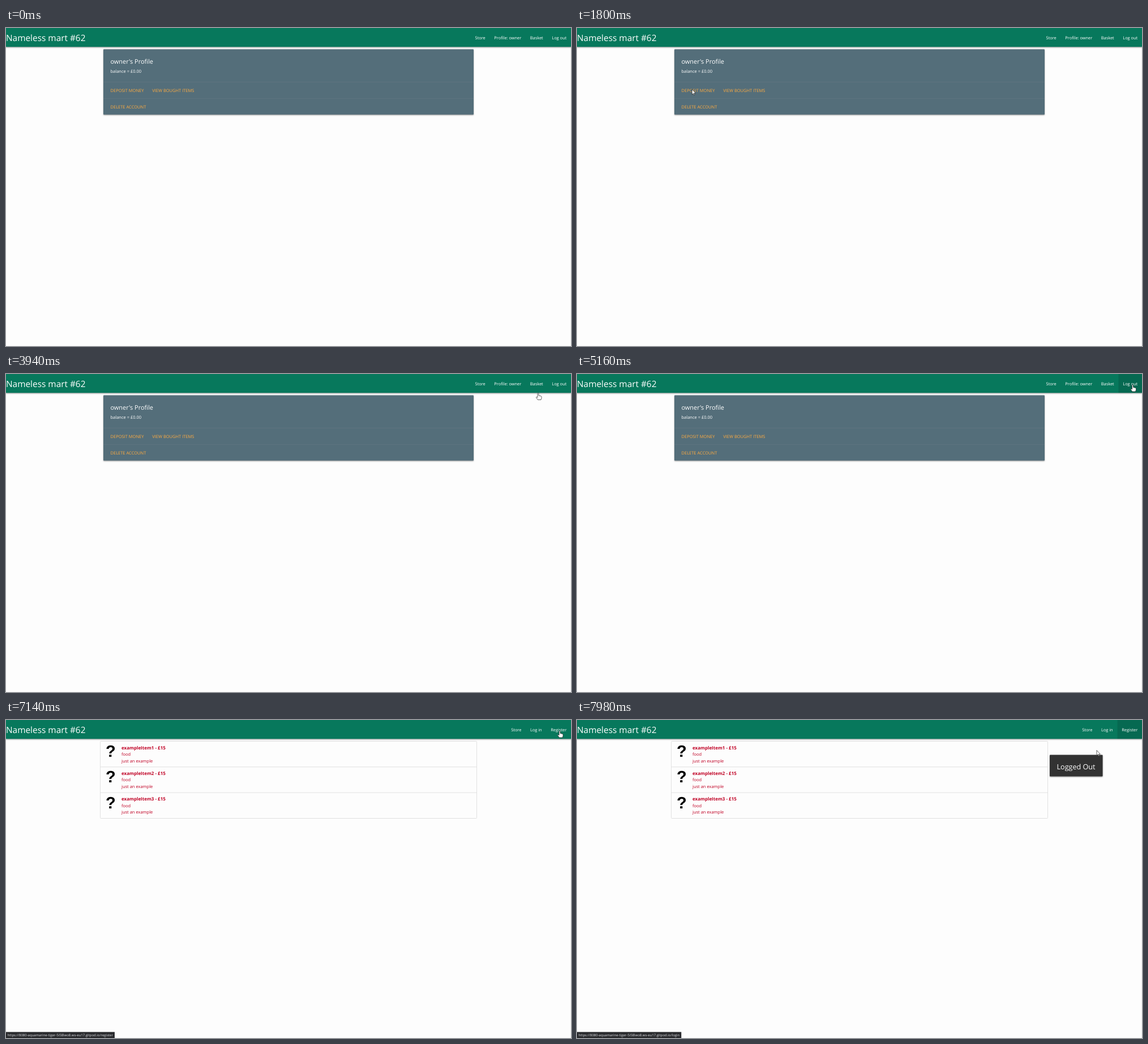
An HTML page that plays this animation: 998x561 px, repeating every 8 s.

```html
<!DOCTYPE html>
<html lang="en">
<head>
<meta charset="utf-8">
<style>
  html, body { margin: 0; width: 100%; height: 100%; overflow: hidden; background: #fdfdfd; }
  svg { display: block; width: 998px; height: 561px; font: 7.5px "Open Sans", "Noto Sans", sans-serif; text-rendering: geometricPrecision; }
  .raised { filter: drop-shadow(0 1px 1px #0006); }
  .white { fill: #fff; }
  .nav { fill: #fff; font-size: 7.4px; }
  .link { fill: #ffab40; }
  .item { fill: #c00024; }
  .name { font-size: 8px; font-weight: 700; }
  .mark { font: bold 29px "Liberation Sans", sans-serif; fill: #000; }
  .rule { fill: none; stroke: #dadada; stroke-width: .8; }
  .pointer { fill: #fff; stroke: #222; stroke-width: .7; stroke-linejoin: round; }
</style>
</head>
<body>
<svg viewBox="0 0 998 561">
  <rect x="997" y="34" width="1" height="527" fill="#f1f1f1"/>
  <rect class="raised" width="998" height="33.3" fill="#07785c"/>
  <text class="white" y="23" font-size="15.4">Nameless mart #62</text>

  <g id="profile">
    <rect class="raised" x="172" y="37.5" width="654" height="115.3" rx="1" fill="#546e7a"/>
    <path d="M172 95.3H826M172 124.3H826" stroke="#a0a0a0" stroke-opacity=".2" stroke-width=".7"/>
    <g class="white">
      <text x="184.5" y="63" font-size="10.9">owner's Profile</text>
      <text x="184.5" y="79.4" font-weight="500">balance = £0.00</text>
    </g>
    <g class="link">
      <text id="deposit" x="184.5" y="113">DEPOSIT MONEY</text>
      <text x="258.3" y="113">VIEW BOUGHT ITEMS</text>
      <text x="184.5" y="141.7">DELETE ACCOUNT</text>
    </g>
  </g>

  <g id="store">
    <rect class="rule" x="166.5" y="37.5" width="665" height="136" rx="1"/>
    <g id="items"></g>
    <g id="toast">
      <rect class="raised" x="835" y="61.4" width="93.5" height="38" rx="1" fill="#323232"/>
      <text class="white" x="847.5" y="87.2" font-size="12.6">Logged Out</text>
    </g>
  </g>

  <g id="status">
    <rect id="statusBox" y="550.4" height="10.6" fill="#292a2d"/>
    <text id="statusText" x="2.5" y="558" font-size="6" fill="#dfe1e5"></text>
  </g>

  <g id="cursor" class="pointer">
    <path id="arrow" d="M0 0V9.2L2.1 7.2 3.5 10.3 4.8 9.7 3.4 6.7H6.4Z"/>
    <path id="hand" d="M-1 1.2Q-1 0 0 0T1 1.2V4.6L5 5.4Q6 5.7 6 7V9L5 12H-.6L-3.4 8.2Q-3.6 6.8-2.4 7L-1 8Z"/>
  </g>
</svg>
<script>
const LOOP = 8000, LOGGED_OUT = 7140, ROW = 45.3;
const HOST = 'https://8080-aquamarine-tiger-5i58lwo8.ws-eu17.gitpod.io/';
const $ = id => document.getElementById(id);
const ramp = (t, from, to) => Math.min(1, Math.max(0, (t - from) / (to - from)));
const show = (id, on) => $(id).style.display = on ? '' : 'none';
const fade = (id, amount) => $(id).style.opacity = amount;

function add(parent, tag, attributes, text = '') {
  const node = document.createElementNS('http://www.w3.org/2000/svg', tag);
  for (const name in attributes) node.setAttribute(name, attributes[name]);
  node.textContent = text;
  return parent.appendChild(node);
}

// Lays out padded links from the right edge, each with its own hover panel
function addNav(page, labels) {
  const pad = 7.8;
  let right = 998;
  for (const label of labels.reverse()) {
    const panel = add($(page), 'rect', { id: page + label, height: 33.3, opacity: 0 });
    const text = add($(page), 'text', { class: 'nav', y: 19.5 }, label);
    const width = text.getComputedTextLength() + 2 * pad;
    right -= width;
    text.setAttribute('x', right + pad);
    panel.setAttribute('x', right);
    panel.setAttribute('width', width);
  }
}
addNav('profile', ['Store', 'Profile: owner', 'Basket', 'Log out']);
addNav('store', ['Store', 'Log in', 'Register']);

for (let i = 0; i < 3; i++) {
  const row = add($('items'), 'g', { class: 'item', transform: `translate(0 ${i * ROW})` });
  if (i) add(row, 'path', { class: 'rule', d: 'M166.5 37.5H831.5' });
  add(row, 'text', { class: 'mark', x: 176, y: 65 }, '?');
  add(row, 'text', { class: 'name', x: 204, y: 51.8 }, `exampleItem${i + 1} - £15`);
  add(row, 'text', { x: 204, y: 63.2 }, 'food');
  add(row, 'text', { x: 204, y: 74.6 }, 'just an example');
}

// The pointer reaches (x, y) at one time and rests there until it leaves
const stops = [];
const stop = (arrive, x, y, leave = arrive) => stops.push({ arrive, x, y, leave });
stop(560, 10, 265);
stop(1140, 277, 194, 1540);
stop(1800, 203, 108.5);
stop(2020, 240, 64);
stop(2260, 203, 109, 2420);
stop(2820, 560, 83, 3520);
stop(3860, 938, 20);
stop(3940, 940, 33.5);
stop(4440, 914, 36);
stop(5160, 981.5, 19, 6300);
stop(6420, 978, 19, LOGGED_OUT);
stop(7400, 972, 22.5);
stop(7600, 979, 25.5, 7940);
stop(7980, 918, 53.5);

function pointerAt(t) {
  const i = Math.max(0, stops.findLastIndex(s => s.arrive <= t));
  const a = stops[i], b = stops[i + 1] || a;
  const k = ramp(t, a.leave, b.arrive + (a === b));
  return [a.x + (b.x - a.x) * k, a.y + (b.y - a.y) * k];
}

function draw(t) {
  const loggedOut = t >= LOGGED_OUT;
  show('profile', !loggedOut);
  show('store', loggedOut);

  fade('profileBasket', .1 * (ramp(t, 3960, 4200) - ramp(t, 4400, 4640)));
  fade('profileLog out', .12 * ramp(t, 4780, 5080));
  fade('storeRegister', .12 * ramp(t, 7420, 7720));
  const lit = ramp(t, 2340, 2460) - ramp(t, 2500, 2800);
  $('deposit').style.fill = `rgb(255 ${171 + 45 * lit} ${64 + 102 * lit})`;

  const left = (1 - ramp(t, 7300, 7600)) ** 3;
  $('toast').setAttribute('transform', `translate(0 ${17 * left})`);
  fade('toast', Math.min(1, (1 - left) * 1.4));

  $('statusText').textContent = HOST + (t >= 7960 ? 'login' : loggedOut ? 'register' : 'logout');
  $('statusBox').setAttribute('width', $('statusText').getComputedTextLength() + 5.5);
  fade('status', ramp(t, 5560, 5800));

  const hand = (t >= 2360 && t < 2520) || (t >= 3840 && t < 7960);
  show('cursor', t >= 560);
  show('hand', hand);
  show('arrow', !hand);
  $('cursor').setAttribute('transform', `translate(${pointerAt(t)})`);
}

const start = performance.now();
function tick() {
  draw((performance.now() - start) % LOOP);
  requestAnimationFrame(tick);
}
tick();
</script>
</body>
</html>
```
